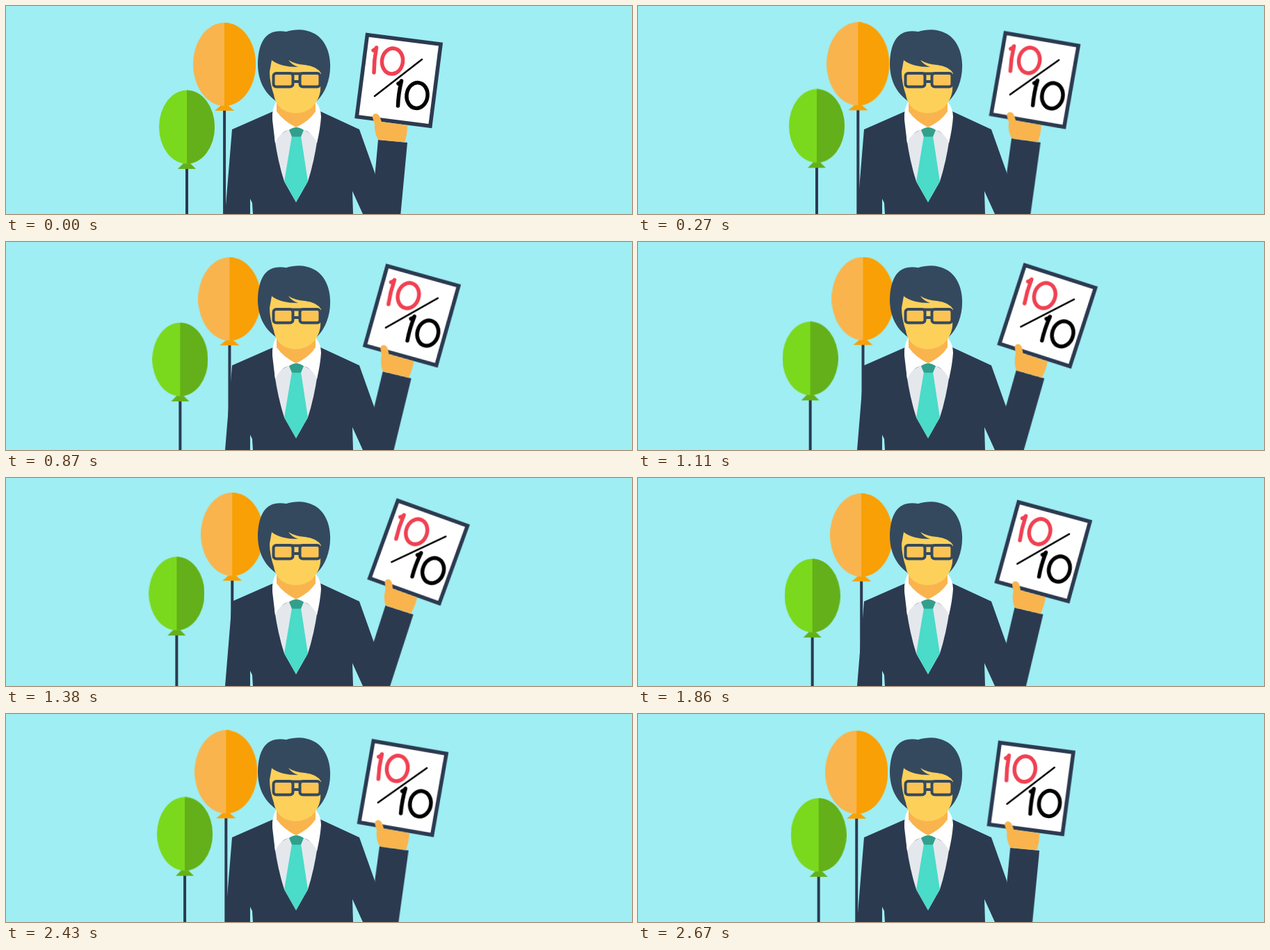
Animation of 900 by 300 pixels, one loop 2.7 s. Source, as an HTML page without scripts:

```html
<!DOCTYPE html>
<html lang="en">
<head>
<meta charset="utf-8">
<title>Full marks</title>
<style>
  html, body { margin: 0; width: 100%; height: 100%; overflow: hidden; background: #9eeef3; }
  svg { display: block; width: 900px; height: 300px; }

  .navy { fill: #2c3a50; }
  .hair { fill: #34495e; }
  .skin { fill: #fdd05a; }
  .shade { fill: #f9b44d; }
  .white { fill: #fff; }
  .string { stroke: #2c3a50; stroke-width: 4; }
  .glasses { fill: none; stroke: #34495e; stroke-width: 4; }
  .pen { fill: none; stroke-width: 5.5; stroke-linecap: round; stroke-linejoin: round; }
  .red { stroke: #f04152; }
  .black { stroke: #000; }

  .sway { animation: 1.35s linear infinite alternate; }
  .orange { animation-name: drift-right; }
  .green { animation-name: drift-left; }
  .arm { animation-name: wave; transform-origin: 582px 236px; }
  @keyframes drift-right { to { transform: translate(11.5px, -3px); } }
  @keyframes drift-left { to { transform: translate(-15px, -8px); } }
  @keyframes wave { to { transform: rotate(12.9deg); } }
</style>
</head>
<body>
<svg viewBox="0 0 900 300">
  <g class="sway orange">
    <path class="string" d="M314 148V320"/>
    <path fill="#f8a005" d="M314 139L328 151H300Z"/>
    <ellipse class="shade" cx="314" cy="84" rx="45" ry="60"/>
    <path fill="#f8a005" d="M314 24A45 60 0 0 1 314 144Z"/>
  </g>

  <g class="sway green">
    <path class="string" d="M260 232V320"/>
    <path fill="#64b01a" d="M260 222L273 235H247Z"/>
    <ellipse fill="#7ad91c" cx="260" cy="174.5" rx="40" ry="53"/>
    <path fill="#64b01a" d="M260 121.5A40 53 0 0 1 260 227.5Z"/>
  </g>

  <!-- Jacket, shirt and tie -->
  <path class="navy" d="M325 178L384 152H452L508 178L530 240L545 300H513L498 267L499 300H355L354 284L351 278V300H315Z"/>
  <path fill="#e4e8ed" d="M386 190L417 172L448 190Q443 225 434 253L417 283L400 253Q391 225 386 190Z"/>
  <path class="white" d="M388 139Q382 148 383 164L387 198Q394 179 417 176Q440 179 447 198Q452 176 453 160Q453 148 446 139Z"/>
  <path class="shade" d="M389 132V152Q399 166 417 175Q436 166 445 152V132Z"/>
  <path fill="#4bdbc9" d="M411 187H424L434 253L417 283L400 253Z"/>
  <path fill="#329f8c" d="M407 179Q417 171 428 179L424 188.500H411Z"/>

  <!-- Head -->
  <path class="hair" d="M388 137C370 124 362 105 362 83C363 51 374 32 403 37C425 30 450 36 460 58C468 74 468 97 461 115Q456 128 447 137Z"/>
  <path class="skin" d="M382 78Q394 88 420 88Q411 85 406 78Q416 84 430 85Q447 87 453 97L452 122C449 142 435 154.500 417 154.500C400 154.500 388 145 385 128Q379 110 379 95Z"/>
  <g class="glasses">
    <rect x="384.500" y="97" width="28" height="19.500" rx="4" fill="#fbc353"/>
    <rect x="422.500" y="97" width="29" height="19.500" rx="4" fill="#fbc353"/>
    <path d="M410 97.500H425M412 109H423"/>
  </g>

  <!-- Raised arm with score card -->
  <g class="sway arm">
    <path class="navy" d="M535 193L577 197L565.500 320H534L528 270Z"/>
    <g transform="translate(517 38.500) rotate(7.300)">
      <rect class="navy" width="112" height="124.500"/>
      <rect class="white" x="5.500" y="5.500" width="101" height="113.500"/>
    </g>
    <g class="pen red">
      <path d="M528 64Q532 62 532.500 60Q529 78 529 96"/>
      <ellipse cx="555.500" cy="79.500" rx="15" ry="18.500" transform="rotate(8 555.500 79.500)"/>
    </g>
    <path class="pen black" style="stroke-width: 2.500" d="M598 77L530 130"/>
    <g class="pen black">
      <path d="M564 112Q568 110 568.500 108Q564 127 563.500 144"/>
      <ellipse cx="591" cy="129" rx="15" ry="18.500" transform="rotate(8 591 129)"/>
    </g>
    <path class="shade" d="M527 161C526 154 535 153 537.500 160L540 167L577 172Q577 186 573 196.500L535 193Q529 182 530 170Z"/>
  </g>
</svg>
</body>
</html>
```
